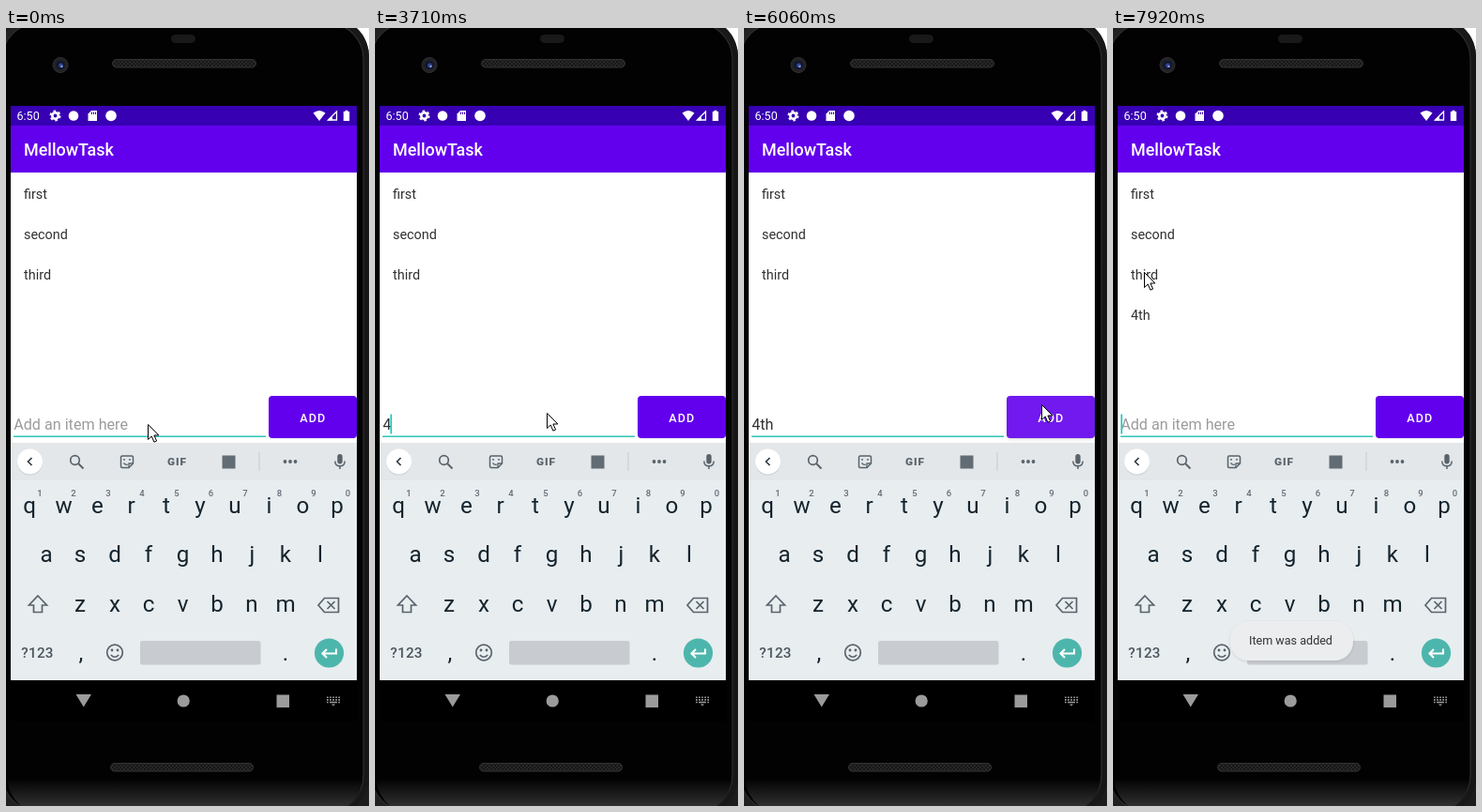
Animation, 387 px wide and 829 px high, one loop 8 s. Source, as an HTML page:

```html
<!DOCTYPE html>
<html lang="en">
<head>
<meta charset="utf-8">
<title>To-do list</title>
<style>
  html, body { margin: 0; width: 100%; height: 100%; overflow: hidden; background: #fff; }
  svg { display: block; width: 387px; height: 829px; font-family: Roboto, sans-serif; }
  .medium { font-weight: 500; }
  .mid { text-anchor: middle; }
  .line { fill: none; stroke: #59636b; stroke-width: 1.7; }
  .list { font-size: 14.4px; fill: #303030; }
  .field { font-size: 16.16px; fill: #303030; }
  .keys { font-size: 24.2px; fill: #14242d; text-anchor: middle; }

  .anim { animation: 8s step-end infinite; }
  #mouse { animation-name: mouse; }
  #caret { animation-name: caret; }
  #hint { animation-name: hint; }
  #c1 { animation-name: c1; }
  #c2 { animation-name: c2; }
  #c3 { animation-name: c3; }
  #press { animation-name: press; filter: drop-shadow(0 2px 2px #000); }
  #item { animation-name: item; }
  #toast { animation-name: toast; }

  @keyframes mouse {
    0% { transform: translate(151px, 422px); }
    2% { transform: translate(153px, 421px); }
    3.5% { transform: translate(157px, 418px); }
    5% { transform: translate(160px, 415px); }
    6.5% { transform: translate(163px, 413px); }
    8.25% { transform: translate(183px, 410px); }
    61.125% { transform: translate(232px, 418px); }
    63% { transform: translate(285px, 450px); }
    64.5% { transform: translate(330px, 449px); }
    66.375% { transform: translate(338px, 449px); }
    67.875% { transform: translate(343px, 448px); }
    69.375% { transform: translate(345px, 447px); }
    71.25% { transform: translate(342px, 440px); }
    72.75% { transform: translate(333px, 425px); }
    74.25% { transform: translate(324px, 410px); }
    75.75% { transform: translate(317px, 401px); }
    77.25% { transform: translate(316px, 399px); }
    87.5% { transform: translate(315px, 399px); }
    89% { transform: translate(312px, 401px); }
    90.75% { transform: translate(235px, 350px); }
    92.25% { transform: translate(103px, 292px); }
    94.125% { transform: translate(70px, 273px); }
    95.625% { transform: translate(45px, 262px); }
    97.125% { transform: translate(35px, 260px); }
    99%, 100% { transform: translate(33px, 260px); }
  }
  @keyframes caret {
    0%, 11.5%, 23.625%, 35% { opacity: 0; transform: none; }
    5%, 18.25%, 30%, 41.75% { opacity: 1; transform: none; }
    46.375% { opacity: 1; transform: translateX(8px); }
    50% { opacity: 1; transform: translateX(13.5px); }
    51.75%, 64.5%, 77.25% { opacity: 1; transform: translateX(22.5px); }
    58%, 71.25%, 81.875% { opacity: 0; transform: translateX(22.5px); }
    83.75%, 97.125%, 100% { opacity: 1; transform: none; }
    90.75% { opacity: 0; transform: none; }
  }
  @keyframes hint { 0%, 83.75%, 100% { opacity: 1; } 46.375% { opacity: 0; } }
  @keyframes c1 { 0%, 83.75%, 100% { fill-opacity: 0; } 46.375% { fill-opacity: 1; } }
  @keyframes c2 { 0%, 83.75%, 100% { fill-opacity: 0; } 50% { fill-opacity: 1; } }
  @keyframes c3 { 0%, 83.75%, 100% { fill-opacity: 0; } 51.75% { fill-opacity: 1; } }
  @keyframes press {
    0%, 85.625%, 100% { opacity: 0; }
    75.75% { opacity: .1; }
    77.25% { opacity: .24; }
    83.75% { opacity: .12; }
  }
  @keyframes item { 0% { opacity: 0; } 85.625%, 100% { opacity: 1; } }
  @keyframes toast {
    0% { opacity: 0; }
    85.625% { opacity: .55; }
    87.5% { opacity: .85; }
    89%, 100% { opacity: 1; }
  }
</style>
</head>
<body>
<svg viewBox="0 0 387 829">
  <defs>
    <pattern id="mesh" width="4" height="4" patternUnits="userSpaceOnUse">
      <rect width="4" height="4" fill="#161616"/>
      <path d="M0 0l4 4M4 0l-4 4" stroke="#2e2e2e" stroke-width=".8"/>
    </pattern>
    <linearGradient id="rim" x1="0" x2="1">
      <stop offset="0" stop-color="#202020"/>
      <stop offset=".6" stop-color="#333"/>
      <stop offset="1" stop-color="#161616"/>
    </linearGradient>
    <linearGradient id="chin" x1="0" x2="0" y1="0" y2="1">
      <stop offset="0" stop-color="#020202"/>
      <stop offset="1" stop-color="#303030"/>
    </linearGradient>
    <filter id="soft" x="-20%" y="-40%" width="140%" height="180%">
      <feDropShadow dx="0" dy="1" stdDeviation="1.5" flood-opacity=".12"/>
    </filter>
  </defs>

  <!-- Phone body -->
  <path d="M0 0h374Q387 12 387 32V829H0z" fill="#1c1c1c"/>
  <rect x="-10" y="-8" width="397" height="846" rx="38" fill="url(#rim)"/>
  <rect x="-4" y="-5" width="385" height="839" rx="38" fill="#020202" stroke="#2c2c2c" stroke-width="1.2"/>
  <path d="M1 800h379q-2 20-16 29H16Q3 818 1 800z" fill="url(#chin)"/>
  <rect x="176" y="7" width="26" height="9" rx="4.5" fill="#191919"/>
  <g fill="url(#mesh)" stroke="#333">
    <rect x="113.5" y="33.5" width="153" height="8.5" rx="4.2"/>
    <rect x="111.5" y="783.5" width="152" height="8.5" rx="4.2"/>
  </g>
  <circle cx="58" cy="39.5" r="8" fill="#222226" stroke="#303034"/>
  <circle cx="58" cy="39.5" r="4.6" fill="#10162c"/>
  <circle cx="58.5" cy="40" r="2.4" fill="#324a94"/>
  <circle cx="59.5" cy="41" r="1" fill="#a9b9ef"/>

  <!-- App -->
  <path d="M5 154h369v288H5z" fill="#fff"/>
  <path d="M5 83h369v21H5z" fill="#3700b3"/>
  <path d="M5 104h369v50H5z" fill="#6200ee"/>
  <g fill="#fff">
    <text x="11.5" y="98" font-size="12.57">6:50</text>
    <circle cx="52.5" cy="93.5" r="3.2" fill="none" stroke="#fff" stroke-width="2.6"/>
    <circle cx="52.5" cy="93.5" r="5" fill="none" stroke="#fff" stroke-width="2" stroke-dasharray="2.6 2.636"/>
    <circle cx="72" cy="93.5" r="5.3"/>
    <path d="M91 88h6v11h-9.500v-7.500z"/>
    <path d="M91.500 89.500v2.500M93.500 89.500v2.500M95.500 89.500v2.500" stroke="#3700b3"/>
    <circle cx="112" cy="93.5" r="5.8"/>
    <path d="M327.500 90.500q6.500-5 13 0l-6.500 8.500z"/>
    <path d="M343.500 98l9-9v9z" fill="none" stroke="#fff" stroke-width="1.3"/>
    <path d="M343 98.500l5-5v5z"/>
    <path d="M359.800 89h1.700v-1.200h3V89h1.700v10h-6.400z"/>
    <text class="medium" x="19" y="136" font-size="17.96">MellowTask</text>
  </g>
  <g class="list">
    <text x="19" y="181.5">first</text>
    <text x="19" y="224.5">second</text>
    <text x="19" y="267.5">third</text>
    <text class="anim" id="item" x="19" y="310.5">4th</text>
  </g>
  <text class="field anim" id="hint" x="8.2" y="428" style="fill:#9b9b9b">Add an item here</text>
  <text class="field" x="8.2" y="428"><tspan class="anim" id="c1">4</tspan><tspan class="anim" id="c2">t</tspan><tspan class="anim" id="c3">h</tspan></text>
  <path d="M8 435.200h269" stroke="#2fc4b8" stroke-width="1.6"/>
  <rect class="anim" id="caret" x="8.3" y="411.5" width="1.7" height="21" fill="#1fcdc0"/>
  <rect x="280" y="392.500" width="94" height="45" rx="4" fill="#000" opacity=".15"/>
  <rect x="280" y="392" width="94" height="45" rx="4" fill="#6200ee"/>
  <rect class="anim" id="press" x="280" y="392" width="94" height="45" rx="4" fill="#fff"/>
  <text class="medium" x="313.2" y="419.5" font-size="12.57" letter-spacing="1.12" fill="#fff">ADD</text>

  <!-- Keyboard -->
  <path d="M5 442h369v253H5z" fill="#e8edf0"/>
  <path d="M5 442h369v40H5z" fill="#e3e7ea"/>
  <circle cx="25.5" cy="462.8" r="13.6" fill="#000" opacity=".12"/>
  <circle cx="25.5" cy="462" r="13.5" fill="#fff"/>
  <g class="line">
    <path d="M27.500 458l-4 4 4 4" stroke="#333b41"/>
    <circle cx="73.5" cy="460.5" r="4.8"/>
    <path d="M77 464l5.500 5.500" stroke-width="2"/>
    <path d="M124 456h10q1.500 0 1.500 1.500v6.500l-4.500 4.500h-7q-1.500 0-1.500-1.500v-9.500q0-1.500 1.500-1.500z" stroke-width="1.5"/>
    <path d="M135 464h-4v4.500M125.500 463.500q2 2.500 4.500 1.500" stroke-width="1.3"/>
    <path d="M126 459v1.800M132 459v1.800" stroke-width="1.6"/>
    <path d="M270 452v20" stroke="#c6cbcf" stroke-width="1"/>
    <path d="M350.800 461.500q0 5.300 5.200 5.300t5.200-5.300M356 467v3" stroke-width="1.5"/>
  </g>
  <text class="mid" x="182.5" y="466" font-size="11.8" font-weight="900" letter-spacing="1" fill="#59636b">GIF</text>
  <rect x="230.5" y="455.5" width="14" height="14" fill="#626c74"/>
  <g fill="#59636b">
    <circle cx="297.5" cy="462" r="1.9"/>
    <circle cx="303" cy="462" r="1.9"/>
    <circle cx="308.5" cy="462" r="1.9"/>
    <rect x="353.3" y="454" width="5.4" height="10.5" rx="2.7"/>
  </g>

  <g class="keys">
    <text y="516.5" x="25 61.5 97.5 133.5 171 207 244 280.5 316.5 353">qwertyuiop</text>
    <text y="569" x="43 79 116 152 188.5 225 262.5 298 335">asdfghjkl</text>
    <text y="622" x="79 116 152 188.5 225 262 298">zxcvbnm</text>
    <text y="674" x="80 298">,.</text>
  </g>
  <text class="mid medium" y="498.5" x="36 72 109 145 182 218.5 255 291.5 328 364.5" font-size="9.5" fill="#616c74">1234567890</text>
  <text class="mid medium" x="33.5" y="671" font-size="15.2" letter-spacing=".3" fill="#4a555d">?123</text>
  <g class="line">
    <path d="M34 605l9.500 10H38.500v7.500h-9V615H24.500z"/>
    <path d="M339.500 607.500H354.500v15h-15l-6.500-7.500z"/>
    <path d="M342.500 611l8 8M350.500 611l-8 8"/>
    <circle cx="116" cy="665.5" r="8.3"/>
    <path d="M111.800 668q4.200 4.500 8.400 0"/>
  </g>
  <g fill="#59636b">
    <circle cx="113" cy="663" r="1.4"/>
    <circle cx="119" cy="663" r="1.4"/>
  </g>
  <rect x="143" y="653" width="128.5" height="25.5" rx="2.5" fill="#c8ccd0"/>
  <circle cx="344.5" cy="666" r="15.6" fill="#4db6ac"/>
  <path d="M352 661.500v5h-14.500M342 662l-4.500 4.500 4.500 4.500" fill="none" stroke="#fff" stroke-width="2.1"/>

  <!-- Navigation bar -->
  <path d="M5 695h369v44H5z" fill="#000"/>
  <g fill="#9b9b9b">
    <path d="M74.500 710h16.500l-8.250 13.500z"/>
    <circle cx="189.2" cy="717" r="6.6"/>
    <rect x="288.5" y="710.5" width="13.5" height="13.5"/>
  </g>
  <g fill="none" stroke="#9b9b9b" stroke-width="1.6">
    <path d="M342 713.300h14M342 715.900h14" stroke-dasharray="1.7 1.38"/>
    <path d="M342 718.500h1.700M345 718.500h8M354.300 718.500h1.700"/>
  </g>
  <path d="M347 720.500h4l-2 2z" fill="#9b9b9b"/>

  <g class="anim" id="toast">
    <rect x="125" y="632" width="131" height="42" rx="20" fill="#ebedee" filter="url(#soft)"/>
    <text class="mid" x="189.5" y="657" font-size="12.57" fill="#333">Item was added</text>
  </g>

  <g class="anim" id="mouse">
    <path d="M.5 .5v16l3.700-3.500 2.700 6.200 2.700-1.200-2.700-6h5z" fill="#fff" stroke="#000" stroke-linejoin="round"/>
  </g>
</svg>
</body>
</html>
```
